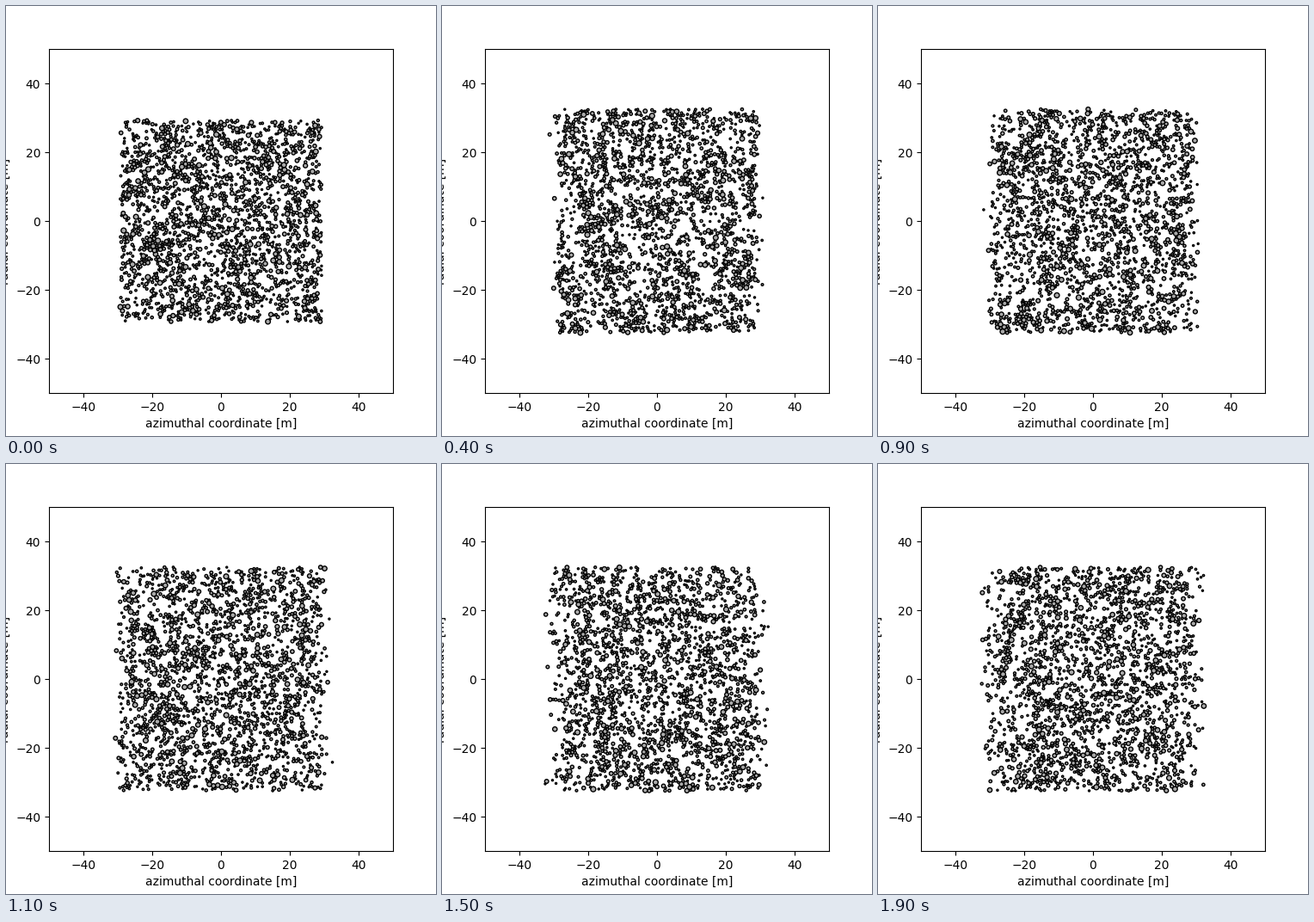
Recreate the animation shown at these times as a matplotlib script. Size 500 px wide and 500 px high, loop 2 s.

```python
import numpy as np
import matplotlib.pyplot as plt
from matplotlib.animation import FuncAnimation
from matplotlib.collections import EllipseCollection

FRAMES = 20
BOX = 65.0            # side of the periodic shearing box [m]
COUNT = 2000
R_MIN, R_MAX = 0.25, 0.75
STEP = 2 * np.pi / 10  # orbital phase per frame

rng = np.random.default_rng(11)


def power_law(n, lo, hi, slope):
    p = slope + 1
    u = rng.random(n)
    return ((hi**p - lo**p) * u + lo**p) ** (1 / p)


radius = power_law(COUNT, R_MIN, R_MAX, -3)
start = rng.uniform(-0.45 * BOX, 0.45 * BOX, (COUNT, 2))
drift = rng.normal(0, 0.13, COUNT)
swing = rng.normal(0, 0.6, COUNT)
phase = rng.uniform(0, 2 * np.pi, COUNT)


def wrap(v):
    return (v + BOX / 2) % BOX - BOX / 2


def separate(pos, half):
    """Push overlapping particles apart, keeping them in the box."""
    d2 = ((pos[:, None, :] - pos[None, :, :]) ** 2).sum(axis=2)
    a, b = np.nonzero(np.triu(d2 < (2 * R_MAX + 0.6) ** 2, 1))
    reach = radius[a] + radius[b]
    for _ in range(10):
        gap = pos[a] - pos[b]
        dist = np.hypot(gap[:, 0], gap[:, 1]) + 1e-6
        push = np.maximum(reach - dist, 0) / dist / 2
        move = gap * push[:, None]
        np.add.at(pos, a, move)
        np.add.at(pos, b, -move)
        pos = np.clip(pos, -half, half)
    return pos


def positions(i):
    if i == 0:
        return separate(start.copy(), 0.45 * BOX)
    t = STEP * i
    x = start[:, 0] + drift * i + swing * (np.cos(t + phase) - np.cos(phase))
    crossed = np.round(x / BOX)
    y = (start[:, 1]
         - 1.5 * t * (start[:, 0] + drift * i / 2 - crossed * BOX)
         - 2 * swing * (np.sin(t + phase) - np.sin(phase)))
    return separate(np.column_stack([wrap(x), wrap(y)]), BOX / 2)


fig = plt.figure(figsize=(5, 5), dpi=100)
ax = fig.add_axes([0.1, 0.1, 0.8, 0.8])
ax.set(xlim=(-50, 50), ylim=(-50, 50),
       xticks=range(-40, 41, 20), yticks=range(-40, 41, 20),
       xlabel="azimuthal coordinate [m]", ylabel="radial coordinate [m]")

dots = EllipseCollection(
    2 * radius, 2 * radius, np.zeros(COUNT), units="xy",
    offsets=positions(0), offset_transform=ax.transData,
    facecolor="darkgray", edgecolor="black", linewidth=1)
ax.add_collection(dots)


def draw(i):
    dots.set_offsets(positions(i))
    return (dots,)


anim = FuncAnimation(fig, draw, frames=FRAMES, interval=100,
                     repeat=True, repeat_delay=0, blit=False)
plt.show()
```
